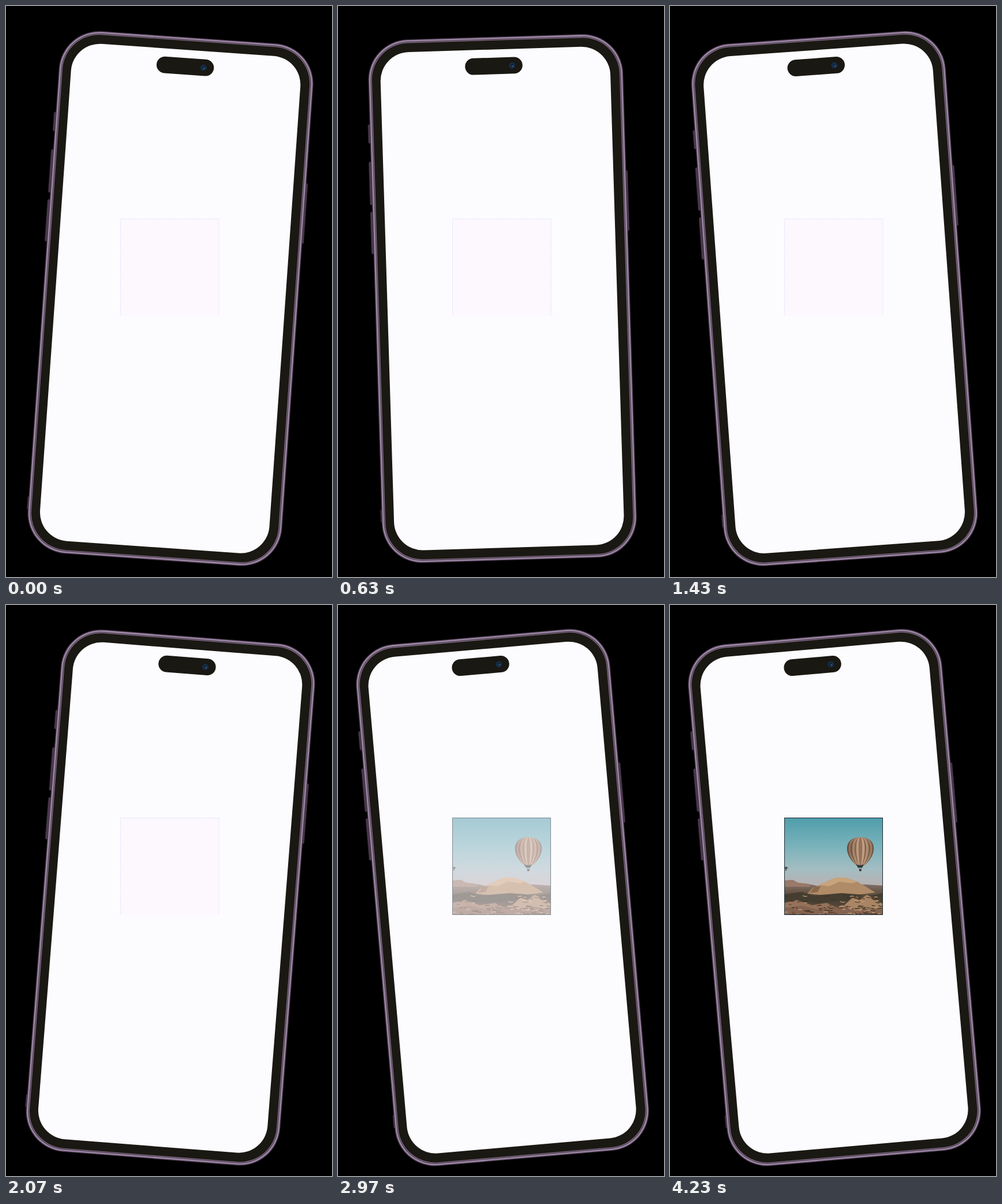
An HTML page that plays this animation: 565x991 px, repeating every 4260 ms.

```html
<!DOCTYPE html>
<html lang="en">
<head>
<meta charset="utf-8">
<title>Phone shake</title>
<style>
  html, body { margin: 0; width: 100%; height: 100%; overflow: hidden; background: #000; }
  svg { display: block; width: 565px; height: 991px; }
</style>
</head>
<body>
<svg viewBox="0 0 565 991">
  <defs>
    <linearGradient id="sky" x1="0" y1="0" x2="0" y2="1">
      <stop offset="0" stop-color="#4f9dab"/>
      <stop offset=".4" stop-color="#78b2ba"/>
      <stop offset=".75" stop-color="#a3bdc2"/>
      <stop offset="1" stop-color="#b9b0b0"/>
    </linearGradient>
    <linearGradient id="land" x1="0" y1="0" x2="0" y2="1">
      <stop offset="0" stop-color="#8d7d7a"/>
      <stop offset=".3" stop-color="#6b594a"/>
      <stop offset=".6" stop-color="#4a4033"/>
      <stop offset="1" stop-color="#73573f"/>
    </linearGradient>
    <linearGradient id="shade">
      <stop offset="0" stop-color="#2c1c14" stop-opacity=".5"/>
      <stop offset=".5" stop-color="#2c1c14" stop-opacity="0"/>
      <stop offset="1" stop-color="#2c1c14" stop-opacity=".4"/>
    </linearGradient>
    <clipPath id="crop"><rect width="171" height="169"/></clipPath>
  </defs>

  <g id="phone">
    <g fill="#4a394d" stroke="#221a24" stroke-width=".8">
      <rect x="-223.5" y="-309" width="6" height="33" rx="2"/>
      <rect x="-224" y="-244" width="6" height="75" rx="2"/>
      <rect x="-224" y="-157" width="6" height="73" rx="2"/>
      <rect x="218" y="-216" width="6" height="105" rx="2"/>
      <rect x="-222" y="360" width="4" height="22" rx="1"/>
    </g>
    <g id="body"></g>
    <rect x="-199.25" y="-432.5" width="398.5" height="865" rx="50" fill="#fcfcff"/>
    <rect x="-52.1" y="-418.3" width="99.6" height="28.8" rx="14.4" fill="#1a1812"/>
    <circle cx="29.5" cy="-403.7" r="6.2" fill="#151b24"/>
    <circle cx="29.5" cy="-403.7" r="4.2" fill="#0f2438" stroke="#24435f"/>
    <circle cx="30.5" cy="-402.7" r="1.6" fill="#2b5488"/>
  </g>

  <rect x="198.5" y="369.5" width="170.5" height="168" fill="#fdf8fe"/>
  <path d="M198.5 537V369.5H369V537" fill="none" stroke="#dfe4fb" stroke-dasharray="2 1"/>

  <g id="photo" transform="translate(198 369)" clip-path="url(#crop)">
    <rect width="171" height="119" fill="url(#sky)"/>
    <path d="M0 110L14 109L22 113L40 115L60 119L140 116L171 118V169H0Z" fill="url(#land)"/>
    <path d="M0 109L15 108L24 113L42 115L46 120H0Z" fill="#98796a"/>
    <path d="M40 132L50 121L62 117L78 109L90 104L106 104L126 111L140 119L158 130L120 135L70 135Z" fill="#b08b67"/>
    <path d="M62 117L90 104L106 104L126 111L118 114L96 111L78 119Z" fill="#c8a47d"/>
    <path d="M44 131L52 120L63 119L58 129Z" fill="#8a684d"/>
    <path d="M0 133L30 129L52 135L100 131L150 135L171 131V146L120 142L60 148L0 144Z" fill="#453e30"/>
    <path d="M0 148L22 143L48 152L74 148L92 157L70 169H0Z" fill="#96725a"/>
    <path d="M104 152L118 139L130 143L143 134L156 140L171 150V160L140 155L116 158Z" fill="#a98564"/>
    <path d="M0 157L30 153L62 160L98 154L140 160L171 157V169H0Z" fill="#846350"/>
    <g id="rocks" fill="none" stroke-width="1.3"></g>
    <path d="M0 87L3 85L7 87L4 89V92H2V89Z" fill="#4b514c"/>

    <g id="balloon"></g>
    <path d="M124 81Q131 84 138 81L135 87H128Z" fill="#2f3a36"/>
    <path d="M129 87L130 90M134 87L133 90" stroke="#53514a" stroke-width=".6"/>
    <rect x="130" y="89" width="3.6" height="4" fill="#463a32"/>
    <rect x=".5" y=".5" width="170" height="168" fill="none" stroke="#1d2b32"/>
  </g>
</svg>
<script>
const LOOP = 4260;
const SWING = 523;          // one sweep from side to side
const REACH = 5.55;
const LEAD = .136;          // part of the first sweep already done
const REST = 2518, FADE = 820;

const byId = id => document.getElementById(id);
const phone = byId('phone'), photo = byId('photo');

// Nested rounded shells: inset and colour
const shells = [[0, '#47374b'], [1.3, '#8b7694'], [2.3, '#ad99b5'], [3.6, '#574559'], [5, '#75637b'], [6.4, '#1a1812']];
byId('body').innerHTML = shells.map(([d, c]) =>
  `<rect x="${d - 220.5}" y="${d - 454.5}" width="${442 - 2 * d}" height="${909 - 2 * d}" rx="${70 - d}" fill="${c}"/>`
).join('');

// Balloon gores, widest first
const gore = (k, fill) => {
  const side = s => `${132 + s * 30 * k} 66 ${132 + s * 30 * k} 34 132 34`;
  return `<path fill="${fill}" d="M${132 - 5 * k} 84C${side(-1)}C${132 + 30 * k} 34 ${132 + 30 * k} 66 ${132 + 5 * k} 84Z"/>`;
};
byId('balloon').innerHTML = [1, .9, .74, .62, .44, .32, .14].map((k, i) =>
  gore(k, i % 2 ? '#d0aa88' : '#947360')).join('') + gore(1, 'url(#shade)');

// Scattered ridges, longer and denser towards the viewer
let seed = 7;
const rand = () => (seed = seed * 16807 % 2147483647) / 2147483647;
byId('rocks').innerHTML = Array.from({ length: 110 }, (_, i) => {
  const x = rand() * 171, y = 168 - 34 * rand() ** 1.3, w = 3 + 8 * rand(), h = 5 * rand() - 2;
  return `<path d="M${x} ${y}l${w / 2} ${h}l${w / 2} ${-h / 3}" stroke="${['#3f3327', '#c39d7a', '#5a4534'][i % 3]}"/>`;
}).join('');

function tilt(t) {
  if (t >= REST) return -5;
  const p = (LEAD + t / SWING) % 2;
  return REACH * (2 * Math.abs(p - 1) - 1);
}

const start = performance.now();
function draw() {
  const t = (performance.now() - start) % LOOP;
  phone.setAttribute('transform', `translate(284.6 507.7) rotate(${tilt(t)})`);
  photo.setAttribute('opacity', Math.min(1, Math.max(0, (t - REST - 40) / FADE)));
  requestAnimationFrame(draw);
}
draw();
</script>
</body>
</html>
```
